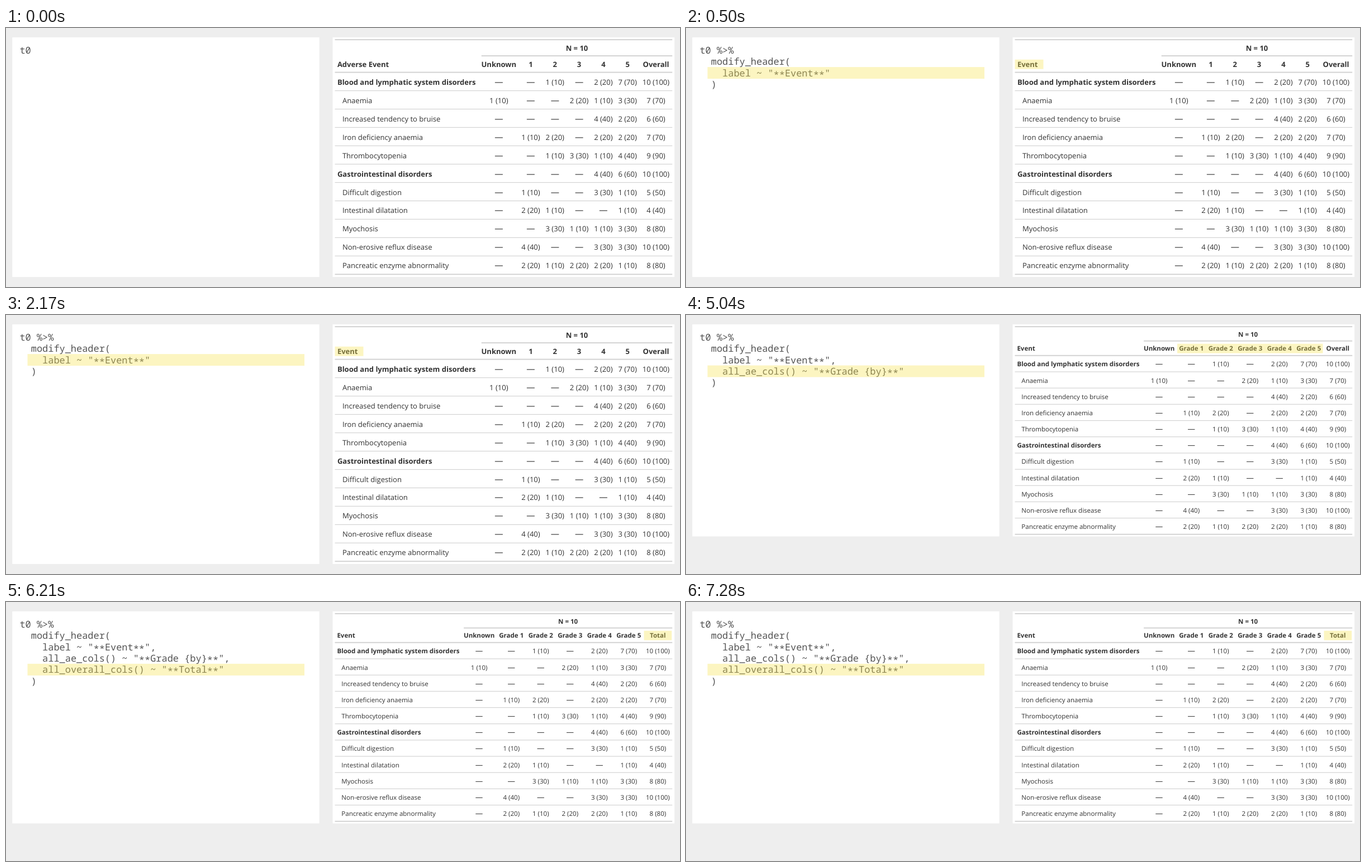
An HTML page that plays this animation: 1206 px wide and 465 px high, repeating every 8 s.

```html
<!DOCTYPE html>
<html lang="en">
<head>
<meta charset="utf-8">
<title>Table header labels</title>
<style>
  html, body { margin: 0; width: 100%; height: 100%; overflow: hidden; background: #eee; }
  svg { display: block; }
  text { font-family: "Open Sans", "Noto Sans", sans-serif; fill: #333; white-space: pre; text-rendering: geometricPrecision; }
  .code { font: 16.95px "Noto Sans Mono", monospace; fill: #545454; font-variant-ligatures: none; }
  .bold { font-weight: 700; }
  .mid { text-anchor: middle; }
  .panel { fill: #fff; }
  .rule { fill: #d3d3d3; }
  .mark { fill: rgba(247, 227, 78, .35); }
</style>
</head>
<body>
<svg id="stage" width="1206" height="465" viewBox="0 0 1206 465"></svg>
<script>
// One digit per column: Unknown, then grades 1-5. A leading space indents the label.
const rows = `Blood and lymphatic system disorders|001027
 Anaemia|100213
 Increased tendency to bruise|000042
 Iron deficiency anaemia|012022
 Thrombocytopenia|001314
Gastrointestinal disorders|000046
 Difficult digestion|010031
 Intestinal dilatation|021001
 Myochosis|003113
 Non-erosive reflux disease|040033
 Pancreatic enzyme abnormality|021221`.split('\n').map(row => {
  const [label, digits] = row.split('|');
  const counts = [...digits].map(Number);
  counts.push(counts.reduce((sum, n) => sum + n));
  return { label: label.trim(), group: label[0] !== ' ', counts };
});

const call = (...args) => ['t0 %>%', '  modify_header(', '    ' + args.join(',\n    '), '  )'].join('\n').split('\n');
const event = 'label ~ "**Event**"';
const grade = 'all_ae_cols() ~ "**Grade {by}**"';
const total = 'all_overall_cols() ~ "**Total**"';

const base = { code: ['t0'], label: 'Adverse Event', prefix: '', overall: 'Overall', scale: 1, gradeWidth: 43.3 };
const renamed = { ...base, start: 500, label: 'Event', code: call(event), marked: 'label' };
const graded = { ...renamed, start: 3290, prefix: 'Grade ', code: call(event, grade), marked: 'grades', scale: .885, gradeWidth: 52.5 };
const totalled = { ...graded, start: 6210, overall: 'Total', code: call(event, grade, total), marked: 'overall' };
const scenes = [{ ...base, start: 0 }, renamed, graded, totalled];

const rect = (x, y, w, h, cls) => `<rect x="${x}" y="${y}" width="${w}" height="${h}" class="${cls}"/>`;
const text = (x, y, str, cls, size) => `<text x="${x}" y="${y}" class="${cls}" font-size="${size}">${str}</text>`;

function codePane({ code, marked }) {
  const charWidth = 10.17, lineHeight = 20.4;
  const lines = code.map((line, i) => {
    const x = 24.4 + line.search(/\S/) * charWidth;
    const str = line.trim().replace(/\*\*/g, '<tspan baseline-shift="-3">**</tspan>');
    return text(x, 45.7 + i * lineHeight, str, 'code', 16.95);
  });
  const markY = 29.3 + (code.length - 2) * lineHeight;
  return lines.join('') + (marked ? rect(38.5, markY, 495.5, 21, 'mark') : '');
}

function tablePane({ label, prefix, overall, scale, gradeWidth, marked }) {
  const left = 588.5, right = 1192.2;
  const size = 13.03 * scale, pad = 4.4 * scale;
  const y = offset => 21 + (offset - .5 * (1 - scale)) * scale;
  const rowY = r => y(58.6 + r * 32.97);

  // Columns are laid out from the right edge.
  const gradesEnd = right - 58.4 * scale;
  const gradesStart = gradesEnd - 5 * gradeWidth;
  const unknownStart = gradesStart - 71 * scale;
  const grades = [1, 2, 3, 4, 5];
  const centers = [(unknownStart + gradesStart) / 2,
    ...grades.map(g => gradesStart + (g - .5) * gradeWidth), (gradesEnd + right) / 2];

  const put = (x, mid, str, cls, fontSize = size) => text(x, mid + size * .36, str, cls, fontSize);
  const rule = (x, mid, h) => rect(x, mid - h / 2, right - x, h, 'rule');

  const spanLeft = unknownStart + pad, headY = y(43.9);
  let out = rule(left, y(0), 2) + rule(spanLeft, y(29), 2) + rule(left, rowY(0), 2);
  out += put((spanLeft + right) / 2, y(15.4), 'N = 10', 'bold mid');
  out += put(left + pad, headY, label, 'bold');
  ['Unknown', ...grades.map(g => prefix + g), overall].forEach((head, c) =>
    out += put(centers[c], headY, head, 'bold mid'));

  rows.forEach((row, r) => {
    const mid = rowY(r) + 17.4 * scale;
    out += put(left + pad + (row.group ? 0 : 9 * scale), mid, row.label, row.group ? 'bold' : '');
    row.counts.forEach((n, c) => out += n
      ? put(centers[c], mid, `${n} (${n * 10})`, 'mid')
      : put(centers[c], mid, '—', 'mid', size * 1.17));
    out += rule(left, rowY(r + 1), r === rows.length - 1 ? 2 : 1.2);
  });

  const spans = { label: [left, left + 51], grades: [gradesStart + 1, gradesEnd - 1], overall: [gradesEnd + 1, right - 1] };
  if (marked) {
    const [from, to] = spans[marked];
    out += rect(from, headY - 8.2, to - from, 17, 'mark');
  }
  return out;
}

function draw(scene) {
  const height = 430.2 * scene.scale;
  return rect(11.3, 16.8, 549.3, height, 'panel') + rect(584.5, 16.8, 611.7, height, 'panel')
    + codePane(scene) + tablePane(scene);
}

const stage = document.getElementById('stage');
let shown;
function tick() {
  const time = performance.now() % 8000;
  const scene = scenes.findLast(s => s.start <= time);
  if (scene !== shown) stage.innerHTML = draw(shown = scene);
  requestAnimationFrame(tick);
}
tick();
</script>
</body>
</html>
```
